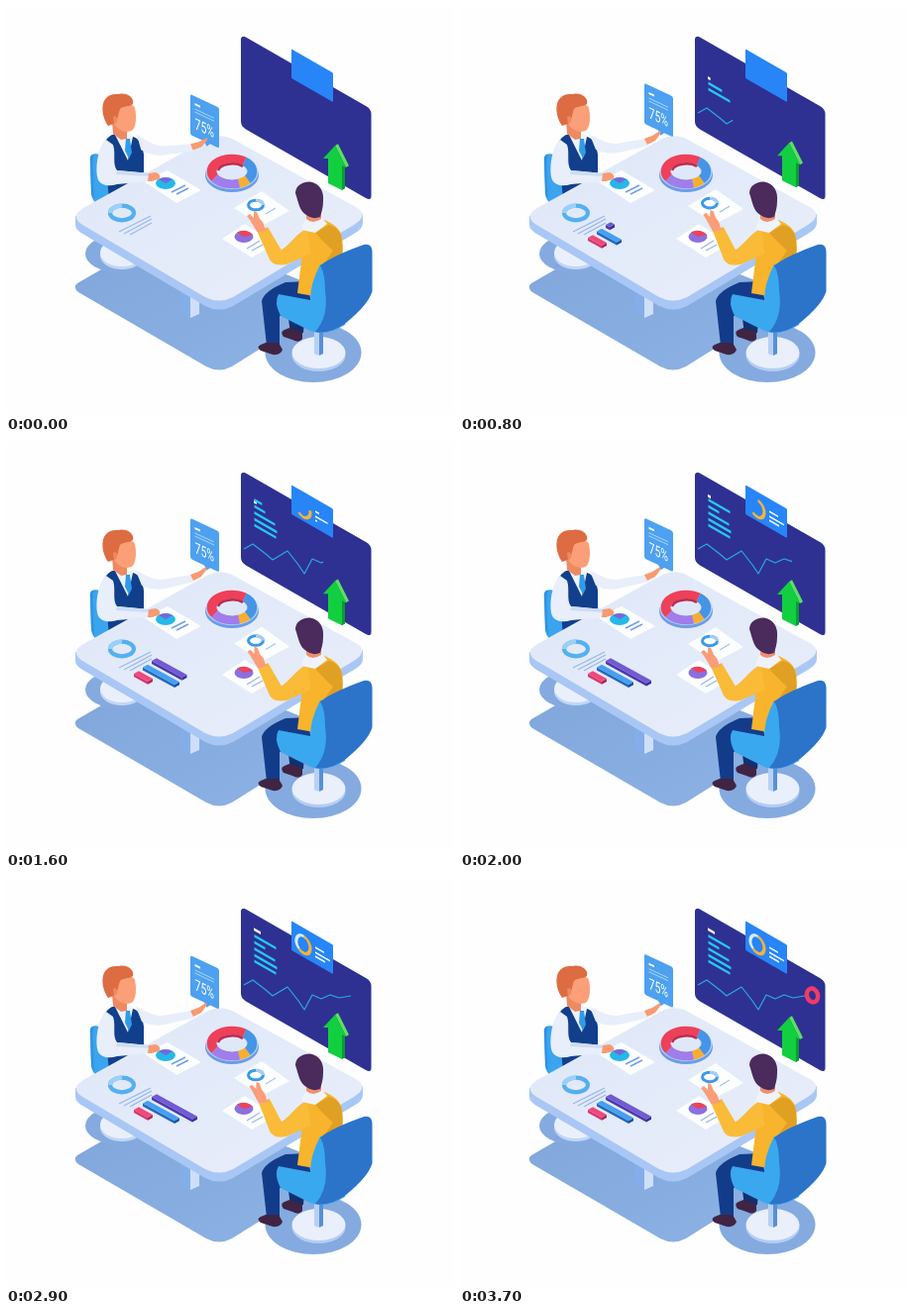
Recreate the animation shown at these times as an HTML page. Size 452x412 px, loop 3800 ms.

```html
<!DOCTYPE html>
<html lang="en">
<head>
<meta charset="utf-8">
<title>Meeting dashboard</title>
<style>
html, body { margin: 0; width: 100%; height: 100%; overflow: hidden; background: #fdfefd; }
svg { display: block; width: 100vw; height: 100vh; }
</style>
</head>
<body>
<svg viewBox="0 0 452 412" fill="none">
  <defs>
    <linearGradient id="topFill" x1="0" y1="0" x2="1" y2="1">
      <stop offset="0" stop-color="#dfe8f9"/><stop offset="1" stop-color="#e8edf9"/>
    </linearGradient>
    <linearGradient id="floorFill" x1="0" y1="0" x2="1" y2="1">
      <stop offset="0" stop-color="#7fa6db"/><stop offset="1" stop-color="#8eb2e4"/>
    </linearGradient>
  </defs>

  <!-- floor shadows and left chair base -->
  <path fill="url(#floorFill)" d="M72 280L110 258L180 230L330 290L290 325L228 364Q215 371 202 364L73 289Q67 284 72 280Z"/>
  <ellipse cx="114" cy="250" rx="34" ry="19" fill="#84aadf"/>
  <ellipse cx="117" cy="252" rx="22" ry="14" fill="#c2d6f6"/>
  <ellipse cx="117" cy="249" rx="22" ry="14" fill="#eaf0fb"/>
  <ellipse cx="310" cy="350" rx="48.500" ry="30" fill="#84aadf"/>

  <!-- seated man, behind the table -->
  <path fill="#3aa4ee" d="M85 157C84 148 93 147 99 153L114 190L92 200Q86 196 86 188Z"/>
  <path fill="#2f93e2" d="M85 157C84 151 87 149 89 150C86 155 88 170 89 195L86 190Z"/>
  <path fill="#eef3fc" d="M106 127L127 130L134 140L124 160Z"/>
  <path fill="#113f8c" d="M99 138C103 132 107 129 110 130L123 156L128 132C134 133 138 141 139 150V184L104 196Z"/>
  <path fill="#ee8a62" d="M107 116L122 126V134L116 135L108 129Z"/>
  <path fill="#fb9f78" d="M110 106C116 99 128 97 130 103C132 112 131 121 128 125C123 129 114 127 109 119Z"/>
  <path fill="#de6c42" d="M103 121C97 113 95 99 101 93C105 88 112 89 114 89C121 87 130 92 128 99C124 102 117 101 115 104C113 109 113 116 109 119Z"/>
  <path fill="#ee8a62" d="M108 112c3-2 5 1 4 5l-3 3z"/>
  <path fill="#2f9be8" d="M121 134L125 134L127 148L124 154L120 146Z"/>

  <!-- table -->
  <path fill="#84aee9" d="M176 285L186 290V315L176 309Z"/>
  <path fill="#cfdff9" d="M186 290L195 286V311L186 315Z"/>
  <path fill="#a9c7f5" d="M70 212V221Q70 226 79 231L201 303Q215 310 229 303L351 230Q360 225 360 219V210Z"/>
  <path fill="url(#topFill)" d="M78 204L204 134Q217 128 230 135L351 202Q368 210 351 221L229 294Q215 301 201 294L79 222Q63 213 78 204Z"/>

  <!-- papers -->
  <path fill="#fdfefe" d="M139 177L163 166L197 186L172 199ZM218 235L241 220L272 240L248 254Z"/>
  <ellipse cx="161" cy="179" rx="10" ry="6" fill="#25b8e8"/>
  <path fill="#7669d8" d="M161 179L154 175Q161 171 168 175Z"/>
  <path stroke="#6f9ee6" stroke-width="1.4" d="M167 188L181 181M172 190L184 184"/>
  <ellipse cx="117" cy="209" rx="12" ry="7.300" stroke="#55b0f0" stroke-width="4.200"/>
  <path stroke="#9bd0f7" stroke-width="4.200" d="M105 209A12 7.300 0 0 1 117 201.700"/>
  <path stroke="#9bb9ea" stroke-width="1.3" d="M114 228L146 212M119 230L147 215M125 231L147 219"/>
  <ellipse cx="240" cy="233" rx="9.500" ry="6" fill="#8c6fe0"/>
  <path fill="#ed4258" d="M240 233L233 228.500Q241 224 249 231Z"/>
  <path stroke="#9bb5e6" stroke-width="1.300" d="M243 245L256 237M248 247L259 241"/>
  <g id="sheet">
    <path fill="#fdfefe" d="M230 204L258 187L286 207L258 222Z"/>
    <ellipse cx="252" cy="201" rx="7.500" ry="4.800" stroke="#3a9aea" stroke-width="3"/>
    <path stroke="#a9cdf3" stroke-width="3" d="M252 196.200A7.500 4.800 0 0 1 259.500 201"/>
    <path stroke="#a8c3ee" stroke-width="1.200" d="M262 210L272 204"/>
  </g>

  <!-- large ring on the table -->
  <ellipse cx="228" cy="171" rx="27" ry="17" fill="#6a9de6"/>
  <ellipse cx="228" cy="168" rx="26.500" ry="17" fill="#b7d1f7"/>
  <g id="bigRing" stroke-width="9.500"></g>
  <ellipse cx="228" cy="167" rx="15" ry="8.500" fill="#dfe8f9"/>
  <path stroke="#bb2b50" stroke-width="2.500" d="M214 166A14.500 8 0 0 1 239 162"/>

  <g id="bars"></g>

  <!-- floating card and seated man's arms -->
  <g id="card">
    <g transform="matrix(1 .47 0 1 186 0)">
      <path fill="#4da1f0" d="M2 0H27Q29 0 29 2V39Q29 41 27 41H20L16.500 45L14 41H2Q0 41 0 39V2Q0 0 2 0Z"/>
      <path stroke="#fff" stroke-width="2" d="M4.500 8H10"/>
      <path stroke="#a9d4fa" stroke-width="1" d="M4.500 13H24M4.500 16H24"/>
      <text transform="translate(4.500 33) scale(.68 1)" fill="#fff" font-family="Roboto, sans-serif" font-size="15.500">75%</text>
    </g>
  </g>
  <path fill="#e8eefa" d="M101 135C94 140 90 160 92 172C93 181 103 183 112 180L146 177V169L112 166C107 160 111 148 108 140Z"/>
  <path fill="#cddcf4" d="M112 166L146 169L145 172L111 170Z"/>
  <path fill="#f89a72" d="M144 169L151 168Q158 171 154 175L147 177L143 177Z"/>
  <g id="reach">
    <path fill="#e8eefa" d="M131 130C138 132 145 139 158 139L187 134L190 141L160 148C149 150 141 147 137 145Z"/>
    <path fill="#f89a72" d="M186 134L194 131L202 126Q204 127 200 132L197 136L189 140Z"/>
  </g>

  <!-- wall screen -->
  <g transform="matrix(1 .575 0 1 237 28.600)">
    <rect width="131.500" height="93" rx="5" fill="#2e3192"/>
    <path id="title" stroke="#fff" stroke-width="2.800"/>
    <path id="list" stroke="#27c8f2" stroke-width="2.600"/>
  </g>
  <path id="trend" stroke="#2aa9e4" stroke-width="1.200" stroke-linejoin="round"/>
  <g id="marker">
    <ellipse rx="5.500" ry="7" transform="rotate(-18)" stroke="#ef3b68" stroke-width="4.500"/>
  </g>
  <g transform="matrix(1 .575 0 1 288 43.300)">
    <rect width="42" height="29.500" rx="1" fill="#2785f8"/>
    <path id="notes" stroke="#fff" stroke-width="1.600"/>
    <g id="gauge" stroke-width="3"></g>
  </g>

  <g id="arrow">
    <path fill="#5fdf62" d="M332 138L335 136.300L346 158.300L343 160Z"/>
    <path fill="#0b9a33" d="M339 157L342 157V181.300L339 183Z"/>
    <path fill="#12cf40" d="M332 138L343 160L339 158V183L325 176V151L320 151Z"/>
  </g>

  <!-- man seen from behind -->
  <ellipse cx="315.500" cy="353" rx="27" ry="16" fill="#b5cdf3"/>
  <ellipse cx="315.500" cy="350" rx="27" ry="16" fill="#e9effb"/>
  <path fill="#b8d0f5" d="M311 322H320V351Q315 354 311 351Z"/>
  <path fill="#5790d7" d="M316 322H320V351L316 353Z"/>
  <path fill="#10306f" d="M281 285L303 290L300 330L287 331Z"/>
  <path fill="#402444" d="M286 325L299 329V336Q296 341 289 337L280 334Q276 329 281 327Z"/>
  <path fill="#123c8a" d="M304 278L282 279Q260 288 258 298L263 343L276 342L276 313L310 313Z"/>
  <path fill="#402444" d="M262 340L275 340L279 347Q277 353 269 352L257 348Q252 344 257 342Z"/>
  <path fill="#f7b42c" d="M300 225L318 215Q337 221 339 234Q342 251 334 265L317 294L294 290L299 250Z"/>
  <path fill="#e0a024" d="M326 221Q340 225 339 240Q341 254 336 262L320 290L311 291L318 264L330 247Q322 240 312 229Z"/>
  <path fill="#f9bb38" d="M304 225C294 228 288 240 277 247L268 256Q272 263 283 261L308 250Z"/>
  <g id="forearm">
    <path fill="#f9bb38" d="M281 252L264 223L254 229L266 256Q271 264 282 260Z"/>
    <path fill="#fa9d78" d="M254 229L246 216L243 212L246 210L250 214L250 207L253 208L256 215Q260 218 261 224L264 226Z"/>
  </g>
  <path fill="#eef3fc" d="M300 219L304 213L319 214L324 220L312 229L298 226Z"/>
  <path fill="#ef9070" d="M303 207L318 207L318 215Q309 221 303 215Z"/>
  <path fill="#4a2b5c" d="M292 189C292 181 300 177 307 177.500C317 179 321 188 320 197C320 204 318 209 317 213Q309 216 303 211C296 207 295 198 292 189Z"/>
  <path fill="#39a8ef" d="M317 261Q307 280 307 297L275 291Q270 299 277 313L307 328Q322 334 342 322L352 275Z"/>
  <path fill="#2b74ca" d="M317 262Q330 252 361 241Q369 239 369.500 248V288Q366 301 343 320Q326 332 312 329Q326 313 322 288Q322 270 317 262Z"/>
</svg>

<script>
const $ = id => document.getElementById(id);
const LOOP = 3800;

// Linear interpolation through [time, value] pairs.
function track(t, keys) {
  if (t <= keys[0][0]) return keys[0][1];
  for (let i = 1; i < keys.length; i++) {
    const [a, x] = keys[i - 1], [b, y] = keys[i];
    if (t < b) return x + (y - x) * (t - a) / (b - a);
  }
  return keys[keys.length - 1][1];
}

const poly = pts => 'M' + pts.map(p => p.join(' ')).join('L') + 'Z';
const shape = (d, fill) => `<path d="${d}" fill="${fill}"/>`;
const move = (id, value) => $(id).setAttribute('transform', value);

// Angles in degrees, clockwise from the right.
function arc(cx, cy, rx, ry, from, to, color) {
  if (to - from < 1) return '';
  const at = deg => {
    const a = deg * Math.PI / 180;
    return `${cx + rx * Math.cos(a)} ${cy + ry * Math.sin(a)}`;
  };
  const large = to - from > 180 ? 1 : 0;
  return `<path stroke="${color}" d="M${at(from)}A${rx} ${ry} 0 ${large} 1 ${at(to)}"/>`;
}

$('bigRing').innerHTML = [
  [148, 308, '#ee4059'], [308, 400, '#4694e6'], [40, 70, '#f7ae2d'], [70, 148, '#a07dea']
].map(([a, b, c]) => arc(228, 167, 20.5, 12.5, a, b, c)).join('');

// A flat block lying on the table.
function block(x, y, len, [top, side, end]) {
  if (len < .5) return '';
  const ex = x + len, ey = y + len * .55, w = 5, d = 2.8, h = 3;
  return shape(poly([[x, y], [ex, ey], [ex, ey + h], [x, y + h]]), side) +
    shape(poly([[ex, ey], [ex + w, ey - d], [ex + w, ey - d + h], [ex, ey + h]]), end) +
    shape(poly([[x, y], [ex, ey], [ex + w, ey - d], [x + w, y - d]]), top);
}

const blocks = [
  [147, 221, ['#7259d4', '#493aa8', '#37308e'], [[700, 0], [1200, 20], [2000, 41]]],
  [138, 227.5, ['#459ff0', '#2468bd', '#1b529e'], [[350, 0], [500, 11], [1200, 32]]],
  [129, 234, ['#f0487a', '#d33a6c', '#a82a58'], [[100, 0], [500, 14]]]
];

const rows = [[47.5, 22], [41.5, 23], [35, 21], [28.5, 11], [22, 22]];

const trend = [[240, 108], [249, 103], [262, 113], [269, 119], [284, 110],
  [295, 124], [301, 133], [309, 118], [318, 122], [327, 118], [336, 121], [348, 119]];

function trendPath(end) {
  const pts = trend.filter(p => p[0] < end);
  if (!pts.length) return '';
  pts.push([end, track(end, trend)]);
  return 'M' + pts.map(p => p.join(' ')).join('L');
}

function draw(t) {
  $('bars').innerHTML = blocks.map(([x, y, c, keys]) => block(x, y, track(t, keys), c)).join('');

  $('list').setAttribute('d', rows.map(([y, w], i) => {
    const start = 260 + 300 * i;
    const len = track(t, [[start, 0], [start + 400, w]]);
    return len > 0 ? `M13.500 ${y}h${len}` : '';
  }).join(''));
  const ty = track(t, [[260, 47], [500, 41], [1200, 30], [2000, 18], [2500, 15.5]]);
  const tw = track(t, [[260, 0], [400, 2.5], [2000, 3], [2500, 7]]);
  $('title').setAttribute('d', tw > 0 ? `M13 ${ty}h${tw}` : '');

  $('trend').setAttribute('d', trendPath(
    track(t, [[250, 240], [500, 253], [1200, 305], [2000, 335], [2500, 345], [2900, 348]])));
  move('marker', `translate(355.500 118.500) scale(${track(t, [[3000, 0], [3500, 1]])})`);

  // The gauge fills anticlockwise, gold first, then pale.
  const gold = track(t, [[900, 0], [1200, 70], [2000, 215]]);
  const pale = track(t, [[2000, 0], [2500, 85], [2900, 145]]);
  $('gauge').innerHTML = arc(12, 17, 7, 8.5, 130 - gold, 130, '#f9b33b') +
    arc(12, 17, 7, 8.5, -85 - pale, -85, '#d6eafe');
  const n1 = track(t, [[900, 0], [1200, 10], [2000, 15]]);
  const n2 = track(t, [[1300, 0], [2000, 9]]);
  const n3 = track(t, [[1500, 0], [2000, 10]]);
  $('notes').setAttribute('d',
    [[18, n1], [13, n2], [22, n3]].map(([y, w]) => w > 0 ? `M24 ${y}h${w}` : '').join(''));

  // Two slow sways per loop; the card and arm rise once at the start.
  const sway = .5 - .5 * Math.cos(4 * Math.PI * t / LOOP);
  const drop = (1 - track(t, [[0, 0], [400, 1]])) ** 2;
  move('arrow', `translate(0 ${3 - 3 * sway})`);
  move('sheet', `translate(0 ${-2 * sway})`);
  move('forearm', `rotate(${3 * sway} 272 257)`);
  move('card', `translate(0 ${76.5 + 12.5 * drop + 1.5 * sway})`);
  move('reach', `rotate(${6 * drop} 135 138)`);
}

const begin = performance.now();
function tick() {
  draw((performance.now() - begin) % LOOP);
  requestAnimationFrame(tick);
}
tick();
</script>
</body>
</html>
```
